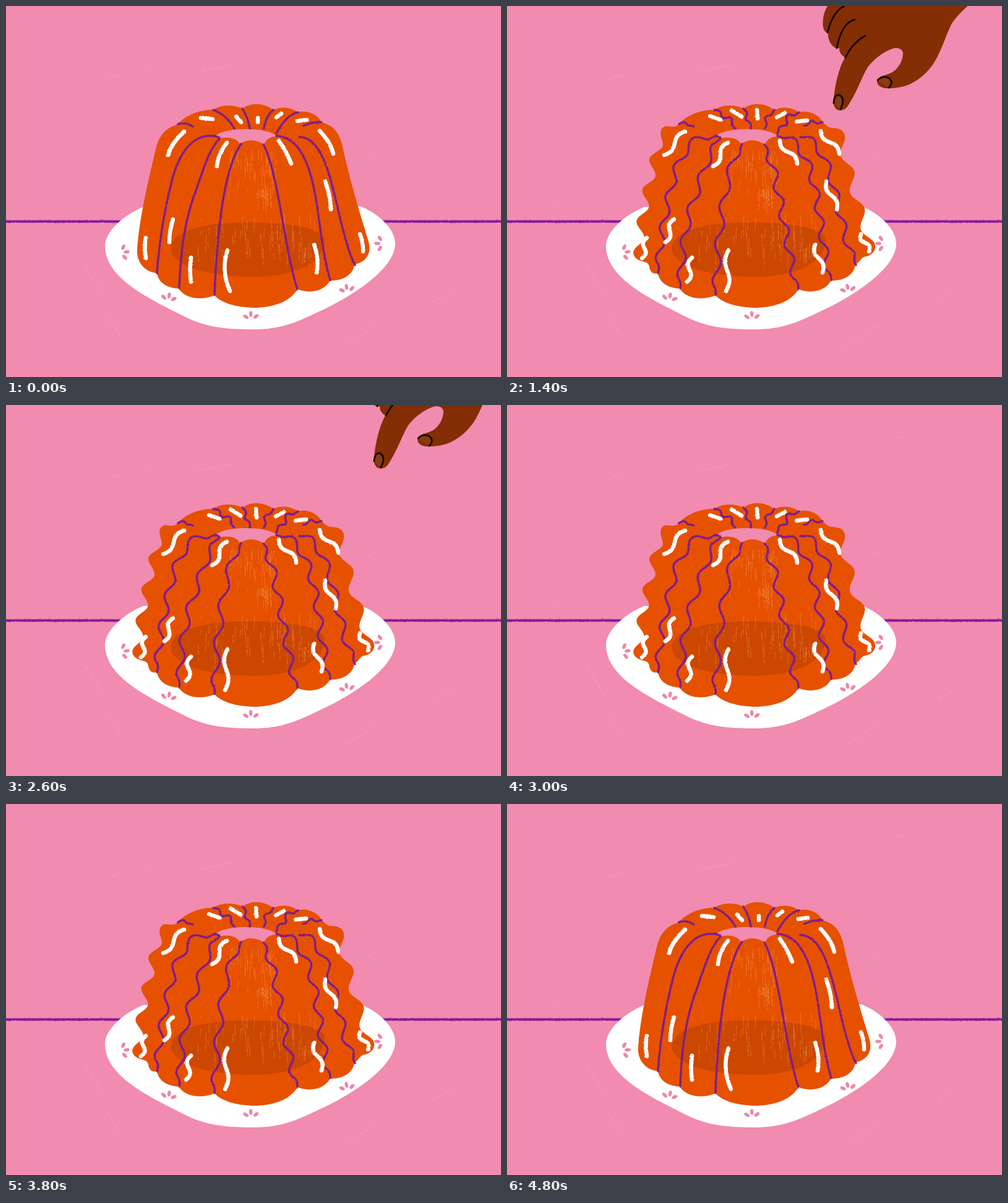
An HTML page that plays this animation: 800x600 px, repeating every 5300 ms.

```html
<!DOCTYPE html>
<html lang="en">
<head>
<meta charset="utf-8">
<title>Wobbling jelly</title>
<style>
html, body { margin: 0; width: 100%; height: 100%; overflow: hidden; background: #f18bb0; }
svg { display: block; width: 800px; height: 600px; }
path { fill: none; stroke-linecap: round; stroke-linejoin: round; }
.rib { stroke: #7f1d8c; stroke-width: 3.4; }
.shine { stroke: #fff; stroke-width: 6.5; }
.ink { stroke: #160800; stroke-width: 2.8; }
.nail { fill: #8b3b10; }
.body { fill: #e65100; }
.shade { fill: #cc4700; }
.pink { fill: #f18bb0; }
.plate { fill: #fff; }
.skin { fill: #832e05; }
.scratch { stroke: #ffd9e6; opacity: .28; stroke-dasharray: 3 4 7 3; }
.grain { stroke: #f5a267; stroke-width: .9; opacity: .5; stroke-dasharray: 5 2 9 4; }
</style>
</head>
<body>
<svg viewBox="0 0 800 600">
  <filter id="rough" filterUnits="userSpaceOnUse" x="0" y="0" width="800" height="600" color-interpolation-filters="sRGB">
    <feTurbulence type="fractalNoise" baseFrequency=".4" numOctaves="1" seed="4"/>
    <feDisplacementMap in="SourceGraphic" scale="2.6" xChannelSelector="R" yChannelSelector="G"/>
  </filter>
  <path class="scratch" d="M165 119L188 113M172 114l10-3M225 102l9-4M310 107l54-12M632 52h10M585 246l12-8M75 324l9-3M125 416l32 53M164 500l20 32M544 552l60-38M690 478l34-17"/>
  <path d="M-5 348.5H805" stroke="#85189a" stroke-width="4" filter="url(#rough)"/>
  <path class="plate" d="M160 388C160 365 190 338 222 325L573 324C605 337 629 362 629 384C629 425 560 470 500 497C470 511 445 523 400 523C350 523 320 518 290 503C230 473 160 440 160 388Z"/>
  <g id="petals"></g>
  <g id="jelly"></g>
  <g id="hand">
    <path class="skin" d="M815 -42L789 -20 765 0C747 16 727 32 718 48C710 64 704 84 697 97C687 119 671 135 650 145Q632 152 612 151Q598 149 598 139C600 129 617 131 627 122C635 115 640 104 640 94Q638 85 627 86C610 90 593 104 583 117C573 133 566 157 550 181Q543 189 534 186Q526 181 528 167C530 146 536 119 546 101Q537 96 537 86C530 89 518 78 519 62C509 59 510 46 511 38C513 20 524 10 536 0L580 -42Z"/>
    <path class="ink" d="M545 18Q526 28 518 61M562 40Q541 45 533 86M579 66Q559 77 547 101"/>
    <path class="ink nail" d="M528 175Q529 161 537 162Q545 166 542 177L539 185M599 138Q608 129 618 135Q625 142 617 150"/>
  </g>
</svg>
<script>
const $ = id => document.getElementById(id);
const path = (cls, d) => `<path class="${cls}" d="${d}"/>`;
const fixed = n => n.toFixed(1);

let seed = 7;
const rand = (lo, hi) => lo + (hi - lo) * (seed = seed * 16807 % 2147483647) / 2147483647;

// Fans of three petals: x, y, direction
$('petals').innerHTML = [[185, 399, -8], [262, 478, -80], [396, 508, -92], [552, 464, -100], [610, 384, 180]]
  .flatMap(([x, y, a]) => [-55, 0, 55].map(turn =>
    `<ellipse cx="10" rx="4.8" ry="2.7" fill="#ee85ab" transform="translate(${x} ${y}) rotate(${a + turn})"/>`)).join('');

// Sample a path, pushing each point sideways by push(s, length)
function bend(d, push) {
  const p = document.createElementNS('http://www.w3.org/2000/svg', 'path');
  p.setAttribute('d', d);
  const len = p.getTotalLength(), n = Math.ceil(len / 4);
  return Array.from({ length: n + 1 }, (_, i) => {
    const s = len * i / n, { x, y } = p.getPointAtLength(s);
    const a = p.getPointAtLength(s - 1), b = p.getPointAtLength(s + 1);
    const k = push(s, len) / Math.hypot(b.x - a.x, b.y - a.y);
    return [fixed(x + (b.y - a.y) * k), fixed(y - (b.x - a.x) * k)];
  });
}
const ripple = (amp, period, crest) => (s, len) =>
  amp * Math.min(1, s / 20, (len - s) / 20) * Math.cos(2 * Math.PI * (s - crest) / period);
const line = pts => 'M' + pts.join('L');

// Each rib runs from the base up: path, ripple period, first crest
const ribs = [
  ['M244 432C248 375 258 322 268 283C280 235 305 201 344 212', 50, 25],
  ['M280 456C282 395 290 345 304 307C319 265 326 236 345 214', 54, 22],
  ['M337 467C340 385 350 264 380 223', 61, 22],
  ['M471 458C450 395 440 268 416 224', 47, 27],
  ['M524 443C513 405 509 366 503 325C494 265 478 212 437 210', 47, 24],
  ['M564 419C550 391 541 347 531 305C519 258 506 213 474 212', 50, 43],
  ...['M278 191Q291 187 302 195', 'M335 168Q356 176 369 198', 'M382 166Q391 180 394 198',
    'M432 168Q419 180 417 198', 'M472 172Q453 176 437 206', 'M510 188Q495 187 480 194'].map(d => [d, 24, 6])];

// Highlights: top, bottom, bow
const shines = [
  [288, 203, 262, 241, -8], [357, 221, 341, 259, -7], [441, 218, 461, 255, 3], [507, 202, 529, 239, 7],
  [516, 284, 525, 329, 4], [270, 345, 264, 382, -3], [226, 375, 226, 408, -3], [299, 407, 299, 446, -3],
  [358, 395, 362, 461, -13], [498, 386, 502, 431, 6], [572, 369, 577, 397, 3]];

function shine([x, y, u, v, bow], swing) {
  if (!swing) return `M${x} ${y}Q${(x + u) / 2 + bow} ${(y + v) / 2} ${u} ${v}`;
  const out = u < 400 ? -8 : 8;
  return line(bend(`M${x} ${y}L${u + out} ${v}`, (s, len) => -4.5 * swing * Math.sin(2 * Math.PI * s / len)));
}
const glints = ['M315 181L334 183M372 179L380 188M407 181V188M445 174L437 180M471 186L486 184',
  'M328 178L345 184M363 169L379 179M404 168L405 182M449 173L436 180M468 187L485 185'];

let grain = '';
for (let i = 0; i < 120; i++) {
  const low = i % 2, x = low ? rand(300, 500) : rand(360, 436);
  const y = low ? rand(335, 405) : rand(232, 305);
  grain += `M${fixed(x)} ${fixed(y)}l${fixed(rand(-1.5, 1.5))} ${fixed(rand(6, 32))}`;
}

const leftEdge = 'M244 432C222 430 211 412 212 395C214 352 228 290 240 240C246 210 255 199 278 191';
const rightEdge = 'M563 418C583 414 592 399 585 378C572 335 558 290 546 237C540 205 531 194 510 188';
const scallops = 'C289 177 314 167 335 168C346 159 369 159 382 166C396 155 418 157 432 168C446 162 461 164 472 172C487 167 506 177 510 188';
const base = 'C561 435 544 445 524 444C514 461 493 466 471 458C459 479 430 488 400 488C370 487 348 480 337 468C318 476 291 475 279 457C260 456 246 447 244 432';

// swing: 0 at rest, 1 and -1 for opposite ripples
function jelly(swing) {
  const amp = swing ? 8 : 0;
  const left = bend(leftEdge, ripple(amp, 51, 50));
  const right = bend(rightEdge, ripple(-amp, 62, 42)).reverse();
  const lines = ribs.map(([d, period, crest]) => line(bend(d, ripple(6 * swing, period, crest)))).join('');
  return '<g>' + path('body', line(left) + scallops + 'L' + right.join('L') + base + 'Z') +
    path('shade', 'M266 391C270 360 330 350 390 350C450 350 512 357 515 378C513 415 470 438 400 438C320 437 268 420 266 391Z') +
    path('pink', 'M340 209C356 196 423 195 438 211Q422 211 417 224Q397 211 378 223Q370 209 345 214Z') +
    path('grain', grain) + '<g filter="url(#rough)">' + path('rib', lines) +
    path('shine', shines.map(h => shine(h, swing)).join('') + glints[swing ? 1 : 0]) + '</g></g>';
}
$('jelly').innerHTML = [0, 1, -1].map(jelly).join('');
const poses = [...$('jelly').children];

// Hand offset for each 200 ms step; none means off stage
const poke = { 1: [35, -55], 2: [22, -37], 3: [0, 0], 4: [-19, 20], 12: [31, -51], 13: [67, -84] };
const handAt = n => n > 4 && n < 12 ? [0, -18] : poke[n];

let shown = -1;
function tick(now) {
  const n = Math.min(24, Math.floor(now % 5300 / 200));
  if (n !== shown) {
    shown = n;
    const pose = n < 6 || n > 23 ? 0 : n % 2 ? 1 : 2;
    poses.forEach((g, i) => g.style.display = i === pose ? '' : 'none');
    const at = handAt(n);
    $('hand').style.display = at ? '' : 'none';
    if (at) $('hand').setAttribute('transform', `translate(${at})`);
  }
  requestAnimationFrame(tick);
}
tick(performance.now());
</script>
</body>
</html>
```
